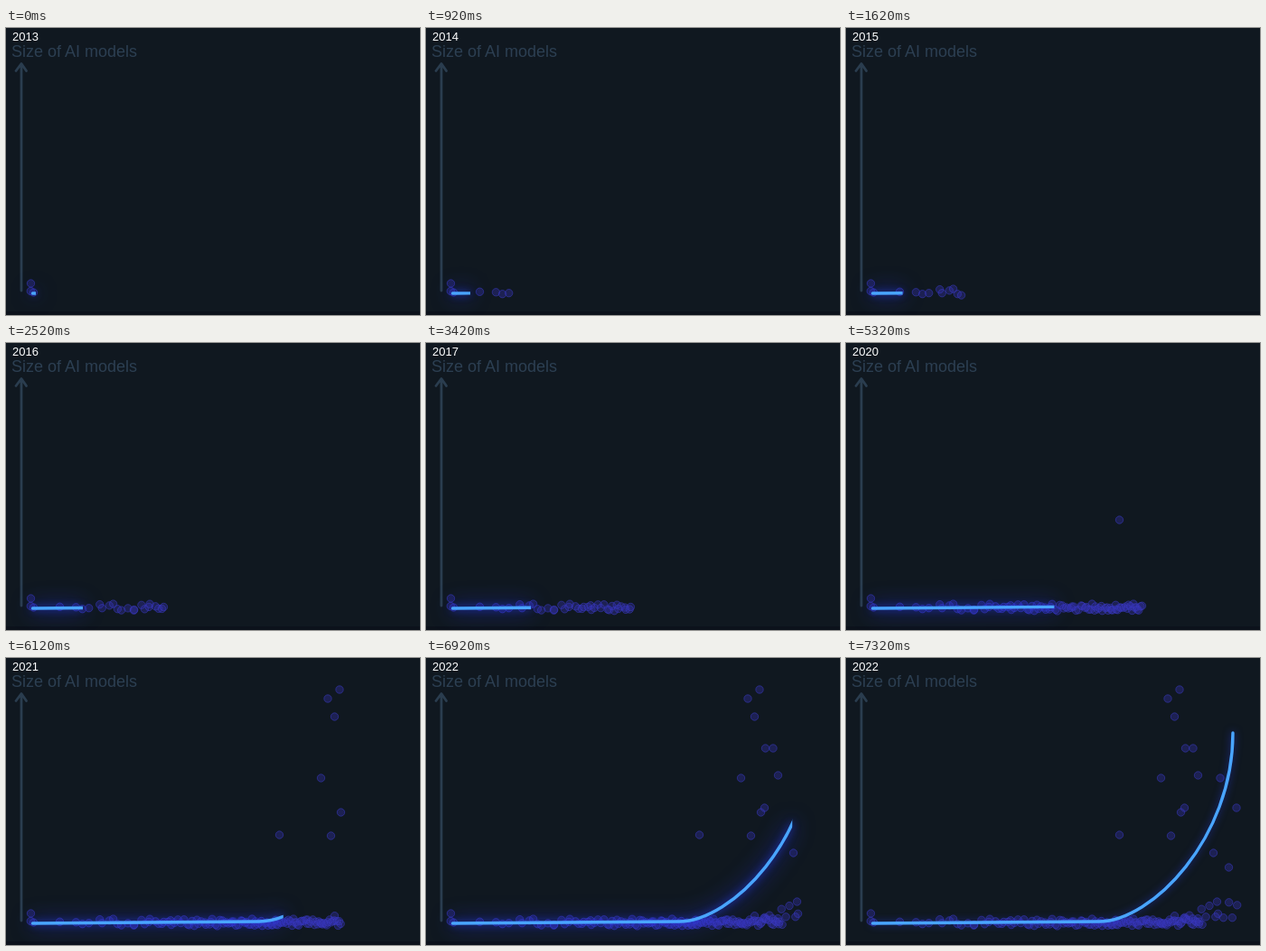
Recreate the animation shown at these times as an HTML page. Size 458 by 318 pixels, loop 7420 ms.

```html
<!DOCTYPE html>
<html lang="en">
<head>
<meta charset="utf-8">
<title>Size of AI models</title>
<style>
  html, body { margin: 0; width: 100%; height: 100%; overflow: hidden; background: #101820; }
  svg { display: block; width: 458px; height: 318px; }
  text { font-family: "Liberation Sans", Arial, sans-serif; }
  .year { font-size: 13px; fill: #fff; }
  .title { font-size: 18px; fill: #2c3f52; }
  .axis { fill: none; stroke: #2a3d4f; stroke-width: 2.8; stroke-linecap: round; stroke-linejoin: round; }
  .dots circle { fill: rgba(54, 50, 175, .36); stroke: rgba(60, 60, 200, .52); stroke-width: 1; }
  .trend { fill: none; stroke: #49a5ff; stroke-width: 3.4; stroke-linecap: round; }
  .glow { filter: drop-shadow(0 0 4px rgba(40, 60, 255, .7)) drop-shadow(0 0 11px rgba(36, 50, 255, .7)); }
  .glow.settled { filter: drop-shadow(0 0 4px rgba(40, 60, 255, .5)); }
</style>
</head>
<body>
<svg viewBox="0 0 458 318">
  <clipPath id="wipe"><rect id="reveal" width="33" height="318"/></clipPath>
  <rect width="458" height="318" fill="#101820"/>
  <rect y="314" width="458" height="4" fill="#0c121b"/>
  <text class="title" x="6" y="32">Size of AI models</text>
  <path class="axis" d="M17 291V40M11 47.5L17 39.5L22.5 47.5"/>
  <g class="dots" id="dots"></g>
  <g class="glow" id="glow">
    <path class="trend" clip-path="url(#wipe)" d="M29.5 294L280 292C338 292 428 200 428 83"/>
  </g>
  <text class="year" id="year" x="7" y="14">2013</text>
</svg>
<script>
const LOOP = 7420;
const STEP = 100;
const byId = id => document.getElementById(id);

// The first two models, then the unusually large ones
const landmarks = [
  [27.5, 283], [30.5, 293],
  [302.5, 196], [348.5, 133], [356, 45], [359.5, 197], [363.5, 65], [369, 35],
  [370.5, 171], [374.5, 166], [375.5, 100], [384, 100], [389.5, 130], [406.5, 216],
  [410.5, 270], [414, 133], [423.5, 232], [432, 166]
];

let seed = 11;
const random = () => (seed = seed * 16807 % 2147483647) / 2147483647;

// A band of small models; a power below 1 crowds them to the right
function scatter(left, right, count, power) {
  return Array.from({ length: count }, (_, i) => {
    const x = left + (right - left) * ((i + random()) / count) ** power;
    const lift = Math.max(0, x - 345) * .28 * random() ** 2;
    return [x, 289 + 8 * random() - lift];
  });
}

function addDot([x, y]) {
  const node = document.createElementNS("http://www.w3.org/2000/svg", "circle");
  node.setAttribute("cx", x);
  node.setAttribute("cy", y);
  node.setAttribute("r", 4.2);
  byId("dots").append(node);
  return { x, node };
}

const dots = [...landmarks, ...scatter(27, 395, 134, .5), ...scatter(397, 434, 8, 1)].map(addDot);

function draw(now) {
  const time = now % LOOP;
  const t = time < 20 ? 0 : 20 + Math.floor((time - 20) / STEP) * STEP;
  const s = t / 1000;
  const dotEdge = 44 + 53.4 * s;
  const lineEdge = 33 + 17 * s + .43 * s ** 3.3;

  for (const { x, node } of dots) node.style.display = x <= dotEdge ? "" : "none";
  byId("reveal").setAttribute("width", lineEdge);
  byId("glow").classList.toggle("settled", t >= LOOP - STEP);
  byId("year").textContent = 2013 + Math.min(9, Math.floor((t + 100) / 730));
}

const start = performance.now();
function tick() {
  draw(performance.now() - start);
  requestAnimationFrame(tick);
}
tick();
</script>
</body>
</html>
```
